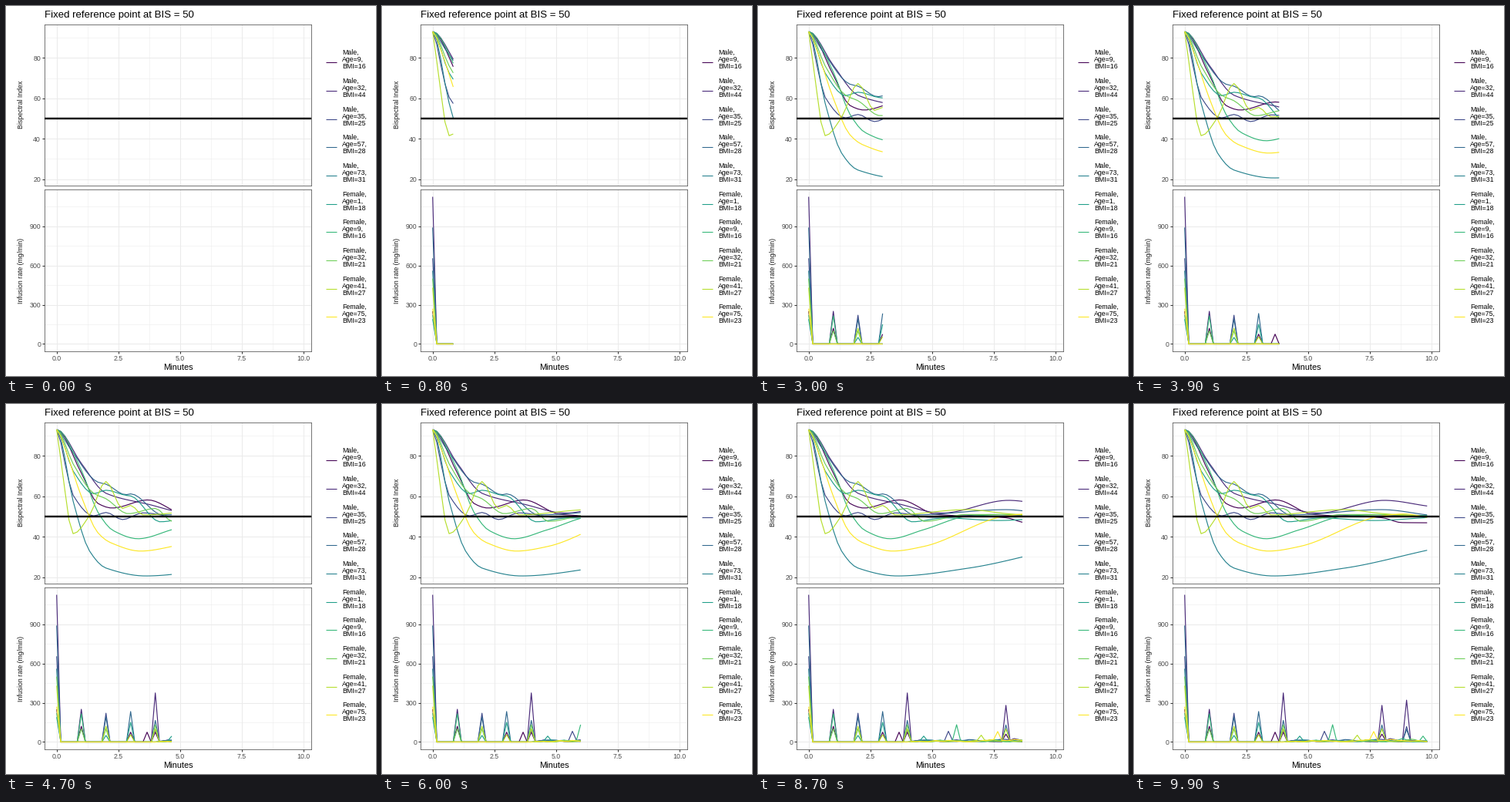
A matplotlib script for the animation above (10 s loop, 480 by 480 pixels).

```python
import matplotlib.pyplot as plt
import numpy as np
from matplotlib.animation import FuncAnimation

SIZE, DPI, FRAMES = 480, 72, 100
STEPS = 59
END = STEPS / 6
LINE = 1.07
plt.rcParams["font.family"] = "Liberation Sans"

colors = plt.get_cmap("viridis")(np.linspace(0, 1, 10))
time = np.arange(STEPS + 1) / 6
rng = np.random.default_rng(5)
subjects = []


def smooth(t, keys):
    """Monotone cubic through (time, value) keys, flat at every extreme."""
    x, v = np.array(keys, float).T
    h, d = np.diff(x), np.diff(v) / np.diff(x)
    slope = np.zeros(len(x))
    same = d[:-1] * d[1:] > 0
    slope[1:-1][same] = 2 * (d[:-1] * d[1:])[same] / (d[:-1] + d[1:])[same]
    slope[-1] = d[-1]
    i = np.clip(np.searchsorted(x, t, side="right") - 1, 0, len(h) - 1)
    s = (t - x[i]) / h[i]
    return (v[i] + (v[i + 1] - v[i]) * s ** 2 * (3 - 2 * s)
            + h[i] * s * (1 - s) * (slope[i] * (1 - s) - slope[i + 1] * s))


def response(keys):
    """Falls from 93 through the keys, then drifts around the set point."""
    keys = [(0, 93), *keys]
    last = keys[-1][0]
    if last < END:
        keys += [((last + END) / 2, 50 + rng.uniform(-2, 2)),
                 (END, 50 + rng.uniform(-.6, .8))]
    return smooth(time, keys)


def infusion(boluses):
    """Single-step boluses on top of a low, noisy drip after four minutes."""
    drip = np.convolve(rng.exponential(8, STEPS + 1), [.25, .5, .25], "same")
    rate = drip * np.clip((time - 4) / .5, 0, 1)
    for minute, dose in boluses.items():
        rate[round(minute * 6)] = dose
    return rate


def add(sex, age, bmi, boluses, *keys):
    label = (f"{sex},", f"Age={age},", f"BMI={bmi}")
    subjects.append((label, response(keys), infusion(boluses)))


add("Male", 9, 16, {0: 250, 1: 120, 3: 75, 3.67: 75, 4: 75, 8: 60},
    (1, 71.5), (1.67, 56.5), (2.25, 54.2), (3.7, 58.2), (5.2, 51),
    (8, 49.4), (8.8, 47), (END, 46.9))
add("Male", 32, 44, {0: 1125, 1: 250, 4: 375, 8: 280, 9: 320},
    (1, 76.3), (2, 61.5), (3.7, 56.1), (5.4, 51.7), (8.1, 58), (END, 55.2))
add("Male", 35, 25, {0: 655, 2: 220, 4: 95, 5.67: 82, 9: 118},
    (.33, 76.5), (.67, 60.5), (1.5, 50.3), (2, 52), (2.67, 48.5),
    (3.5, 51.8), (5, 49.6))
add("Male", 57, 28, {0: 890, 2: 190, 3: 233, 4: 165, 8: 130, 9: 95},
    (.5, 84.5), (1.67, 67), (2, 66), (2.8, 60.8), (3, 61.2), (4.3, 50.8),
    (8, 53.4), (END, 50.8))
add("Male", 73, 31, {0: 560},
    (.67, 57.5), (1.33, 33), (2, 24.5), (3.6, 20.6), (6.5, 24.5), (END, 33.3))
add("Female", 1, 18, {0: 190, 2: 50, 3: 150, 4.67: 45},
    (.67, 72.5), (1.5, 61.3), (2, 63), (2.8, 60.5), (3, 60.2), (4.2, 47.4),
    (5.5, 49.3))
add("Female", 9, 16, {0: 220, 1: 215, 6: 132, 9.67: 45},
    (1, 73), (1.67, 52.2), (2.3, 43), (3.3, 39), (4.67, 43.5), (6.5, 50.2))
add("Female", 32, 21, {0: 500, 1: 100, 2: 100, 4: 130},
    (.67, 76), (1.5, 61.5), (2, 58.8), (2.9, 51.4), (4, 54), (4.7, 47.6),
    (6.4, 51))
add("Female", 41, 27, {0: 430, 2: 120, 3: 55, 4: 100, 7: 52, 8: 100},
    (.17, 78), (.67, 41.5), (1.33, 50.5), (2, 67.3), (2.67, 54), (3, 55.5),
    (3.5, 50.8), (6.4, 53.4))
add("Female", 75, 23, {0: 270, 7.67: 80},
    (.33, 84), (1, 60), (1.67, 42), (2.2, 37), (3.4, 32.9), (4.67, 35.2),
    (8, 50.3))

fig = plt.figure(figsize=(SIZE / DPI, SIZE / DPI), dpi=DPI, facecolor="white")


def text(x, y, s, size, **kw):
    fig.text(x / SIZE, 1 - y / SIZE, s, fontsize=size, **kw)


def panel(top, bottom, ylim, first, step, name):
    left, right = 50, 396
    ax = fig.add_axes([left / SIZE, 1 - bottom / SIZE,
                       (right - left) / SIZE, (bottom - top) / SIZE])
    ax.set(xlim=(-END / 20, END * 1.05), ylim=ylim)
    ax.set_xticks(np.arange(0, 10.1, 2.5))
    ax.set_xticks(np.arange(1.25, 10, 2.5), minor=True)
    major = first + step * np.arange(4)
    ax.set_yticks(major)
    ax.set_yticks(major + step / 2, minor=True)
    ax.set_axisbelow(True)
    ax.grid(which="major", color="#EBEBEB", lw=LINE)
    ax.grid(which="minor", color="#EBEBEB", lw=LINE / 2)
    ax.tick_params(which="major", length=2.75, width=LINE, pad=2.2,
                   color="#333333", labelcolor="#4D4D4D", labelsize=8.8)
    ax.tick_params(which="minor", length=0)
    for spine in ax.spines.values():
        spine.set(color="#555555", linewidth=.8)
    text(19.5, (top + bottom) / 2, name, 8.8, rotation=90, color="#1A1A1A",
         ha="center", va="center")
    return ax


top_ax = panel(23.5, 232.5, (17, 96.7), 20, 20, "Bispectral Index")
low_ax = panel(238, 448, (-56.25, 1181.25), 0, 300, "Infusion rate (mg/min)")
top_ax.tick_params(axis="x", which="both", length=0, labelbottom=False)
top_ax.axhline(50, color="black", lw=2.4, zorder=5, snap=False)

text(50, 15, "Fixed reference point at BIS = 50", 13.2)
text(223, 472.5, "Minutes", 11, ha="center")

curves = []
for i, ((label, bis, rate), color) in enumerate(zip(subjects, colors)):
    y = 73.3 + 36.67 * i
    fig.add_artist(plt.Line2D([415 / SIZE, 429 / SIZE], [1 - y / SIZE] * 2,
                              color=color, lw=LINE, solid_capstyle="butt"))
    for row, s in enumerate(label):
        text(436, y - 10.1 + 9 * row, s, 8.8)
    for ax, data in ((top_ax, bis), (low_ax, rate)):
        line, = ax.plot([], [], color=color, lw=1.15, zorder=3,
                        solid_capstyle="butt", solid_joinstyle="round")
        curves.append((line, data))

# Each sample lands on a whole frame; the tip moves linearly in between.
arrival = np.round(np.arange(STEPS + 1) * (FRAMES - 1) / STEPS)


def draw(frame):
    now = np.interp(frame, arrival, time)
    past = time < now - 1e-9
    for line, data in curves:
        if frame == 0:
            line.set_data([], [])
        else:
            line.set_data(np.append(time[past], now),
                          np.append(data[past], np.interp(now, time, data)))
    return [line for line, _ in curves]


anim = FuncAnimation(fig, draw, frames=FRAMES, interval=100, repeat=True,
                     repeat_delay=0, init_func=lambda: draw(0))
plt.show()
```
